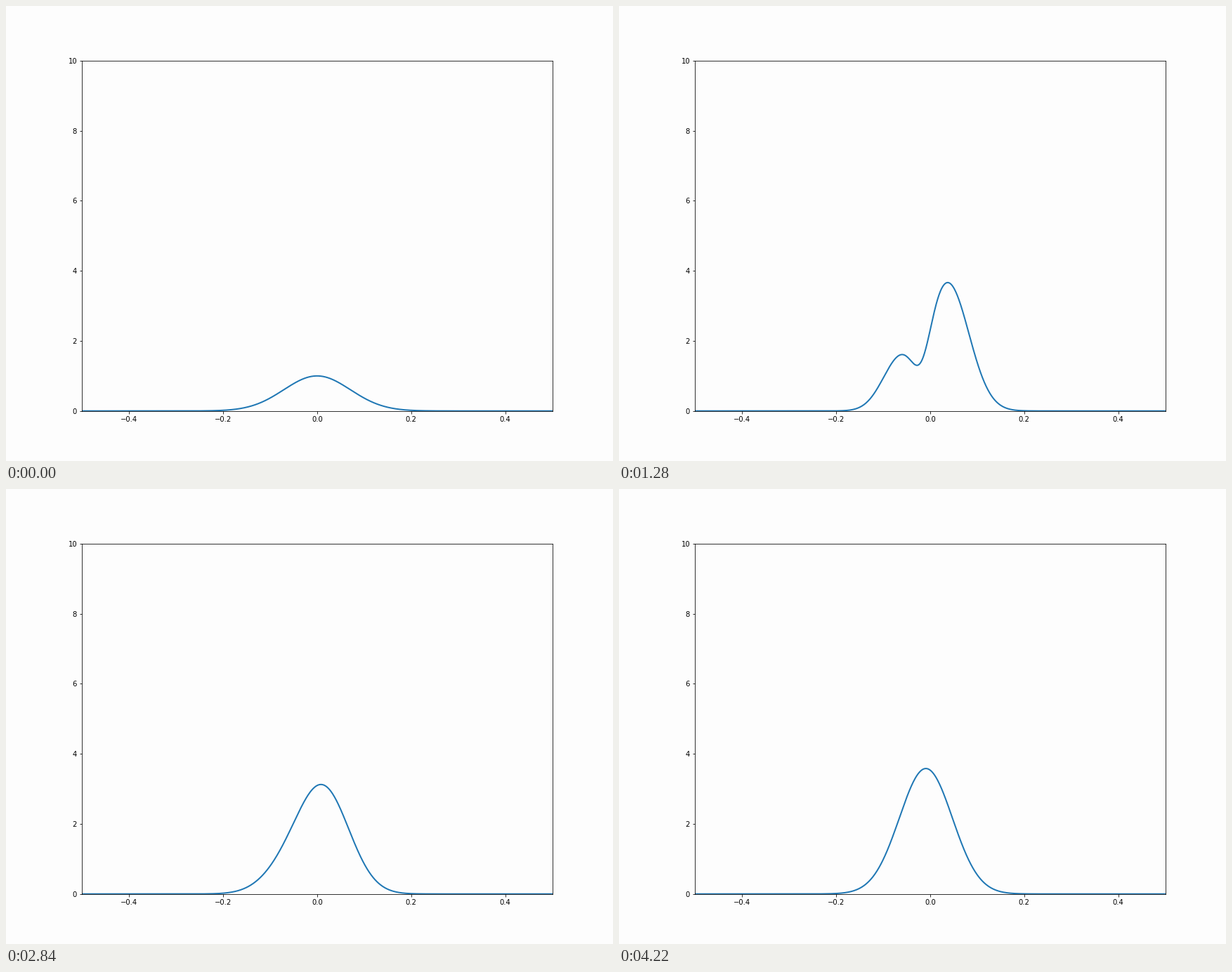
Recreate the animation shown at these times as a matplotlib script. Size 864 px wide and 648 px high, loop 4240 ms.

```python
import numpy as np
import matplotlib.pyplot as plt
from matplotlib.animation import FuncAnimation

FRAMES, INTERVAL = 212, 20
PAPER = "#fdfdfd"


def decay(t, life, power):
    return np.exp(-(t / life) ** power)


def gauss(height, centre, width):
    return height * np.exp(-((x - centre) / width) ** 2)


def mix(a, b, s):
    return a + (b - a) * s


def amplitude(t):
    """A seed pulse breaks into lobes, then relaxes to one drifting pulse."""
    rise = 1 - decay(t, 10, 2)
    early = rise * decay(t, 40, 4)

    # Main lobe: swings right and back, widens, sags while the lobes merge.
    height = 3.76 - .0008 * t - .75 * decay(t - 132, 42, 2)
    centre = .014 + .0232 * np.cos(np.pi * (t - 64) / 156)
    width = .08 - .077 * decay(t, 41, 1)
    main = gauss(mix(1, height, rise), centre * rise, mix(.1, width, rise))

    side = gauss(1.42 * rise * decay(t, 145, 4) + 1.34 * early,
                 -.066 + .0257 * early, .035 + .00027 * t)
    notch = gauss(1.99 * rise * decay(t, 68.8, 3),
                  -.0018 - .00026 * t, .0058 + .00035 * t)
    shoulder = gauss(1.35 * early, .085, .06)
    ripple = gauss(.145 * early, -.152, .033)
    return np.abs(main + side + shoulder - notch - ripple)


plt.rcParams["font.family"] = "DejaVu Sans"
x = np.linspace(-.5, .5, 1001)
fig = plt.figure(figsize=(12, 9), dpi=72, facecolor=PAPER)
ax = fig.add_subplot(facecolor=PAPER)
ax.set_xlim(-.5, .5)
ax.set_ylim(0, 10)
line, = ax.plot(x, amplitude(0), color="#1f77b4", lw=2)


def update(frame):
    line.set_ydata(amplitude(frame))
    return line,


anim = FuncAnimation(fig, update, frames=FRAMES, interval=INTERVAL,
                     repeat=True, repeat_delay=0)
plt.show()
```
